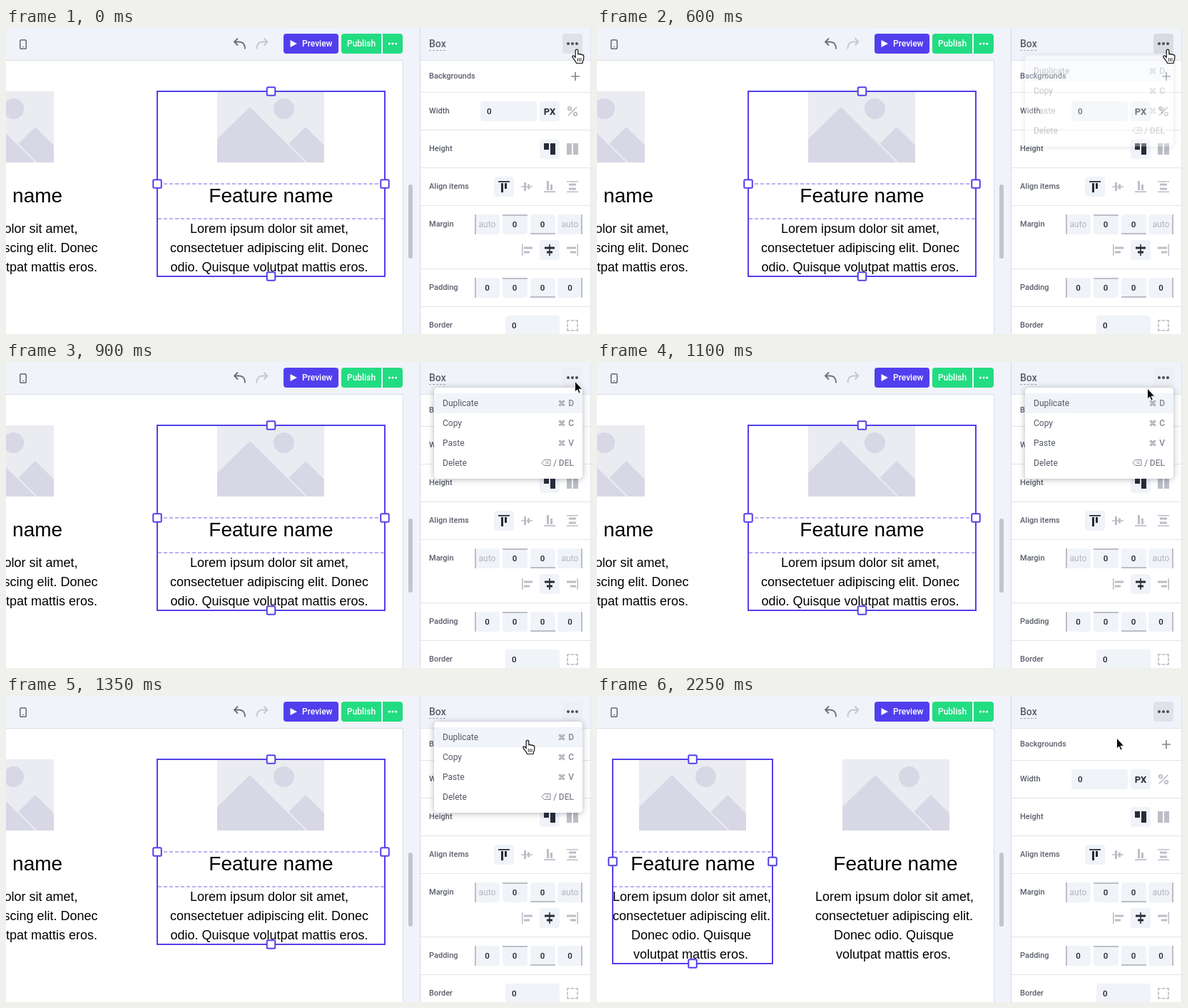
These frames come from a looping animation (820x430 px, 3 s). An HTML page:

```html
<!DOCTYPE html>
<html lang="en">
<head>
<meta charset="utf-8">
<title>Duplicate a box</title>
<style>
  html, body { margin: 0; width: 100%; height: 100%; overflow: hidden; background: #fff; }
  svg { display: block; width: 820px; height: 430px; font-family: Roboto, sans-serif; }
  .mid { text-anchor: middle; }
  .end { text-anchor: end; }
  .bar { fill: #f0f3f9; }
  .field { fill: #f0f3f8; }
  .line { fill: none; stroke: #e1e4ea; }
  .label { font-size: 11px; font-weight: 500; fill: #5a5e6b; }
  .value { font-size: 11.5px; font-weight: 500; fill: #1d2029; }
  .auto { font-size: 12px; fill: #b4b6be; }
  .button { font-size: 12px; font-weight: 500; fill: #fff; }
  .grey { fill: #bcbec7; }
  .dark { fill: #272c39; }
  .heading { font: 28px "Liberation Sans", Arial, sans-serif; text-anchor: middle; }
  .copy { font: 18px "Liberation Sans", Arial, sans-serif; text-anchor: middle; }
  .frame { fill: none; stroke: #5340ea; stroke-width: 2; }
  .dash { stroke: #a197ee; stroke-width: 1.5; stroke-dasharray: 5 3; }
  .item { font-size: 12px; fill: #555966; }
  .key { font-size: 12px; font-weight: 500; fill: #858791; }
  .sign { font: 11px "DejaVu Sans", sans-serif; fill: #858791; }
  .shadow { filter: drop-shadow(0 1px 4px rgba(20, 24, 40, .32)); }

  .before, .after, .more, .menu, .hand, .arrow { animation: 3s step-end infinite; }
  .before { animation-name: before; }
  .after { animation-name: after; }
  .more { animation-name: more; }
  .menu { animation-name: menu; }
  .hand { animation-name: hand; }
  .arrow { animation-name: arrow; }
  .cursor { animation: move 3s step-end infinite; }

  @keyframes before { 0% { opacity: 1; } 70%, 100% { opacity: 0; } }
  @keyframes after { 0% { opacity: 0; } 70%, 100% { opacity: 1; } }
  @keyframes more {
    0% { fill: #e0e2e7; }
    18.33% { fill: #c9cacf; }
    20% { fill: #d9dbe0; }
    21.66% { fill: #e7e9ee; }
    23.33% { fill: #edeff4; }
    71.66% { fill: #e9ebf0; }
    73.33% { fill: #e4e6eb; }
    75%, 100% { fill: #e0e2e7; }
  }
  @keyframes menu {
    0% { opacity: 0; transform: translateY(4px); }
    20% { opacity: .35; transform: translateY(2.5px); }
    21.66% { opacity: .85; transform: translateY(1px); }
    23.33% { opacity: 1; transform: translateY(.5px); }
    25% { opacity: 1; transform: none; }
    70% { opacity: .25; transform: translateY(3px); }
    71.66%, 100% { opacity: 0; transform: translateY(4px); }
  }
  @keyframes hand {
    0% { opacity: 1; }
    21.66% { opacity: 0; }
    40% { opacity: 1; }
    73.33%, 100% { opacity: 0; }
  }
  @keyframes arrow {
    0% { opacity: 0; }
    21.66% { opacity: 1; }
    40% { opacity: 0; }
    73.33%, 100% { opacity: 1; }
  }
  @keyframes move {
    0% { transform: translate(798px, 28px); }
    31.66% { transform: translate(798px, 28px); animation-timing-function: steps(3); }
    36.66% { transform: translate(772px, 38px); animation-timing-function: steps(5); }
    45%, 100% { transform: translate(729px, 60px); }
  }
</style>
</head>
<body>
<svg viewBox="0 0 820 430">
  <defs>
    <g id="picture">
      <path d="M0 0H150V100H0z" fill="#ebebf2"/>
      <circle cx="93.5" cy="24.5" r="14.5" fill="#d7d7e5"/>
      <path d="M0 67 46 22 124 100H0zM124 50 150 76V100H127L100.500 73.500z" fill="#d7d7e5"/>
    </g>
    <rect id="handle" x="-5.75" y="-5.75" width="11.5" height="11.5" rx="1.5" fill="#fff" stroke="#5340ea" stroke-width="2"/>
    <rect id="tile" width="28" height="28" rx="4" class="field"/>
    <g id="dots"><circle cx="-6" r="2"/><circle r="2"/><circle cx="6" r="2"/></g>
    <path id="undo" d="M325 14.500 320 19.500 325 24.500M320.500 19.500H327C333 19.500 335 24 335 29.500" fill="none" stroke-width="1.8"/>
    <g id="sides">
      <rect x="659" width="33" height="28" rx="4" class="field"/>
      <rect x="696" y="1" width="35" height="27" rx="4" class="field"/>
      <rect x="735" width="35" height="27" rx="4" class="field"/>
      <rect x="773" width="33" height="28" rx="4" class="field"/>
      <path d="M657 0h2v28h-2zM696 0h35v2h-35zM735 26h35v2h-35zM806 0h2v28h-2z" class="grey"/>
      <g class="value mid"><text x="713" y="18">0</text><text x="752" y="18">0</text></g>
    </g>
  </defs>

  <!-- Page -->
  <path d="M0 0H820V430H0z" fill="#fff"/>
  <g class="before">
    <use href="#picture" x="-83" y="89"/>
    <use href="#picture" x="296" y="89"/>
    <path class="dash" d="M213 219H530M213 268H530"/>
    <g class="heading"><text x="-8" y="245">Feature name</text><text x="371.5" y="245">Feature name</text></g>
    <g class="copy">
      <text x="-10.500" y="288">Lorem ipsum dolor sit amet,</text>
      <text x="-10.500" y="315">consectetuer adipiscing elit. Donec</text>
      <text x="-10.500" y="342">odio. Quisque volutpat mattis eros.</text>
      <text x="369" y="288">Lorem ipsum dolor sit amet,</text>
      <text x="369" y="315">consectetuer adipiscing elit. Donec</text>
      <text x="369" y="342">odio. Quisque volutpat mattis eros.</text>
    </g>
    <path class="frame" d="M212 89H531V349H212z"/>
    <use href="#handle" x="371.5" y="89"/>
    <use href="#handle" x="212" y="219"/>
    <use href="#handle" x="531" y="219"/>
    <use href="#handle" x="371.5" y="349"/>
  </g>
  <g class="after">
    <use href="#picture" x="59" y="89"/>
    <use href="#picture" x="344" y="89"/>
    <path class="dash" d="M23 219H245M23 268H245"/>
    <g class="heading"><text x="134.5" y="245">Feature name</text><text x="418.5" y="245">Feature name</text></g>
    <g id="columnCopy" class="copy">
      <text x="133" y="288">Lorem ipsum dolor sit amet,</text>
      <text x="132.5" y="315">consectetuer adipiscing elit.</text>
      <text x="132" y="342">Donec odio. Quisque</text>
      <text x="131.5" y="369">volutpat mattis eros.</text>
    </g>
    <use href="#columnCopy" x="284"/>
    <path class="frame" d="M22 89H246V376H22z"/>
    <use href="#handle" x="134" y="89"/>
    <use href="#handle" x="22" y="232.5"/>
    <use href="#handle" x="246" y="232.5"/>
    <use href="#handle" x="134" y="376"/>
  </g>

  <!-- Toolbar -->
  <path class="bar" d="M0 0H580V430H557V45H0z"/>
  <path d="M0 45.500H556.500V430" fill="none" stroke="#d9dee8"/>
  <rect x="564" y="220" width="6" height="104" rx="3" fill="#c3c5cc"/>
  <rect x="19.75" y="16.75" width="8.5" height="12.5" rx="1.8" fill="none" stroke="#666a76" stroke-width="1.5"/>
  <path d="M23 26.500h2" stroke="#666a76"/>
  <use href="#undo" stroke="#6a6e79"/>
  <use href="#undo" stroke="#c4c7ce" transform="translate(686.5) scale(-1 1)"/>
  <rect x="389" y="8" width="77" height="28" rx="4" fill="#513fee"/>
  <path d="M398.500 17 408 22 398.500 27z" fill="#fff"/>
  <path d="M474 8H526V36H474a4 4 0 0 1-4-4V12a4 4 0 0 1 4-4zM528 8H552a4 4 0 0 1 4 4V32a4 4 0 0 1-4 4H528z" fill="#22dc82"/>
  <g class="button"><text x="415" y="26">Preview</text><text x="478" y="26">Publish</text></g>
  <use href="#dots" fill="#fff" transform="translate(542 22) scale(.78)"/>

  <!-- Panel -->
  <path d="M581 0H820V430H581z" fill="#fff"/>
  <path class="bar" d="M581 0H820V45H581z"/>
  <path d="M580.500 0V430" stroke="#d6dae3"/>
  <path class="line" d="M581 45.500H820M581 90.500H820M581 143.500H820M581 196.500H820M581 249.500H820M581 338.500H820M581 391.500H820M819.500 0V430"/>
  <text x="593" y="26.500" font-size="14" font-weight="500" fill="#5a5e6b">Box</text>
  <path d="M593 31.500H617" stroke="#a2a5af" stroke-dasharray="3 2"/>
  <rect class="more" x="780" y="8" width="28" height="28" rx="4"/>
  <use href="#dots" x="794" y="22" fill="#484c59"/>
  <g class="label">
    <text x="593" y="71">Backgrounds</text>
    <text x="593" y="120">Width</text>
    <text x="593" y="173">Height</text>
    <text x="593" y="226">Align items</text>
    <text x="593" y="279">Margin</text>
    <text x="593" y="368">Padding</text>
    <text x="593" y="421">Border</text>
  </g>
  <path d="M792 68H804M798 62V74" stroke="#858893" stroke-width="1.7"/>

  <rect class="field" x="665" y="103" width="79" height="28" rx="4"/>
  <text class="value" x="674" y="121">0</text>
  <use href="#tile" x="748" y="103"/>
  <text class="mid dark" x="762" y="121.500" font-size="13" font-weight="700">PX</text>
  <g fill="none" stroke="#b5b7c0" stroke-width="1.6"><path d="M800 111 788 123"/><circle cx="790" cy="113" r="2.3"/><circle cx="798" cy="121" r="2.3"/></g>

  <use href="#tile" x="748" y="156"/>
  <path class="dark" d="M754 162h7v9h-7zM763 162h7v16h-7z"/>
  <path class="grey" d="M786 162h7v16h-7zM795 162h7v16h-7z"/>

  <use href="#tile" x="684" y="209"/>
  <path class="dark" d="M690 215h16v1.800h-16zM694 218h3v13h-3zM699 218h3v8h-3z"/>
  <path class="grey" d="M722 222.200h16v1.600h-16zM726 217h3v12h-3zM731 219.500h3v7h-3zM754 229.200h16v1.800h-16zM758 215h3v13h-3zM763 220h3v8h-3zM786 215h16v1.600h-16zM786 229.400h16v1.600h-16zM789 218.500h10v3h-10zM789 224.500h10v3h-10z"/>

  <use href="#sides" y="262"/>
  <g class="auto mid"><text x="674.5" y="280">auto</text><text x="790.5" y="280">auto</text></g>
  <use href="#tile" x="748" y="298"/>
  <path class="dark" d="M761.200 304h1.600v16h-1.600zM755 307.500h14v3h-14zM758 313.500h8v3h-8z"/>
  <path class="grey" d="M723 304h1.600v16h-1.600zM726 307.500h12v3h-12zM726 313.500h8v3h-8zM800.400 304h1.600v16h-1.600zM786 307.500h13v3h-13zM791 313.500h8v3h-8z"/>

  <use href="#sides" y="351"/>
  <g class="value mid"><text x="674.5" y="369">0</text><text x="790.5" y="369">0</text></g>

  <rect class="field" x="700" y="404" width="76" height="30" rx="4"/>
  <text class="value" x="709" y="422">0</text>
  <path d="M787 414V411H790M798 411H801V414M801 422V425H798M790 425H787V422M791.500 411H796.500M791.500 425H796.500M787 415.500V420.500M801 415.500V420.500" fill="none" stroke="#b9bbc4" stroke-width="1.6"/>

  <!-- Menu -->
  <g class="menu">
    <rect class="shadow" x="600" y="36" width="208" height="128" rx="5" fill="#fff"/>
    <path d="M600 44H808V72H600z" fill="#f1f4f9"/>
    <g class="item">
      <text x="612" y="61.500">Duplicate</text>
      <text x="612" y="89.500">Copy</text>
      <text x="612" y="117.500">Paste</text>
      <text x="612" y="145.500">Delete</text>
    </g>
    <g class="key end">
      <text x="796" y="61.500">D</text>
      <text x="796" y="89.500">C</text>
      <text x="796" y="117.500">V</text>
      <text x="796" y="145.500">/ DEL</text>
    </g>
    <g class="sign">
      <text x="773.500" y="61.500">⌘</text>
      <text x="773.500" y="89.500">⌘</text>
      <text x="773.500" y="117.500">⌘</text>
    </g>
    <path d="M751 141.500 754.500 137.500H763V145.500H754.500zM756.500 139.500 760.500 143.500M760.500 139.500 756.500 143.500" fill="none" stroke="#858791"/>
  </g>

  <g class="cursor">
    <g class="hand" stroke="#111" stroke-width="1.2" stroke-linejoin="round" stroke-linecap="round">
      <path fill="#fff" d="M.2 13.500V4a1.800 1.800 0 0 1 3.600 0V9c.3-1 2.800-1 3 .3.600-.8 2.600-.6 2.800.6.900-.5 2.200 0 2.200 1.400V14c0 3-1.600 4-1.700 7.500H1.500C1 18.500-2.500 15.500-4 13c-.9-1.500.9-2.800 2.200-1.700z"/>
      <path fill="none" stroke-width=".9" d="M3.300 14.500v4M5.700 14.500v4M8 14.500v4"/>
    </g>
    <path class="arrow" d="M-.5-1V14L2.700 11 5 16.200 7.300 15.200 5.100 10.200H9.700z" fill="#0b0b0d" stroke="#fff" stroke-width=".9"/>
  </g>
</svg>
</body>
</html>
```
